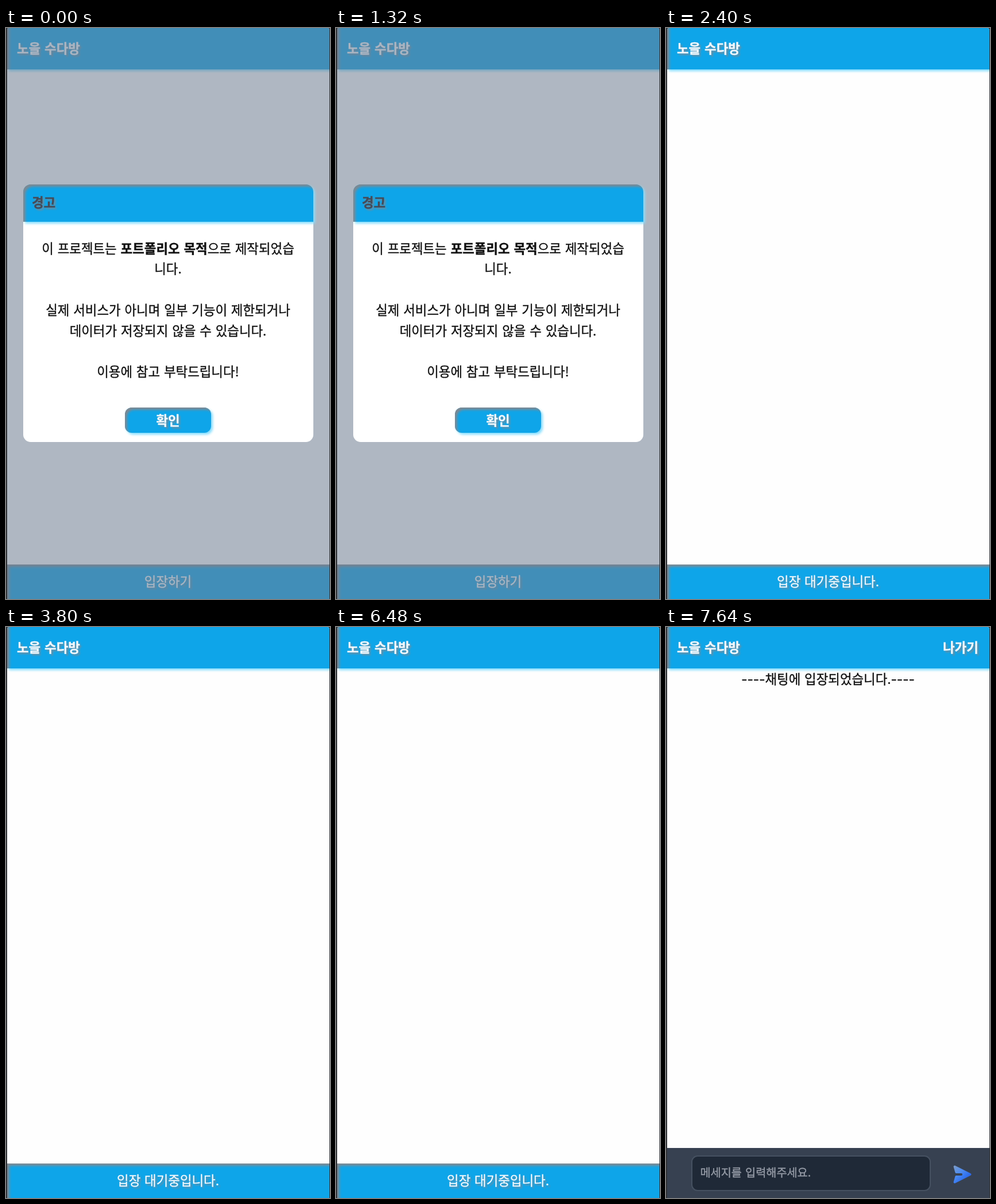
These frames come from a looping animation (564x993 px, 8 s). An HTML page:

```html
<!DOCTYPE html>
<html lang="ko">
<head>
<meta charset="utf-8">
<title>채팅 입장</title>
<style>
  html, body { margin: 0; width: 100%; height: 100%; overflow: hidden; background: #303236; }
  #stage {
    position: relative; width: 564px; height: 993px; overflow: hidden;
    font-family: "Noto Sans CJK KR", "Noto Sans KR", "Noto Sans CJK JP", sans-serif;
    word-spacing: .6px;
  }
  #stage div, #stage svg { position: absolute; box-sizing: border-box; }
  #page { left: 1.5px; top: 0; width: 561px; height: 993px; background: #fefefe; border-radius: 4px 4px 0 0; overflow: hidden; }
  .layer { left: 0; top: 0; width: 564px; height: 993px; }
  .blue {
    background: #0ea5e9;
    box-shadow: inset 4px 4px 4px #808890, 3px 3px 4px #84deff;
  }
  #head { left: 0; top: -10px; width: 570px; height: 82px; }
  #foot { left: 0; top: 933px; width: 570px; height: 70px; }
  #bar { left: 1.5px; top: 906px; width: 561px; height: 87px; background: #374151; }
  #field { left: 44px; top: 919px; width: 417px; height: 62px; background: #1f2937; border: 2px solid #465161; border-radius: 11px; }
  #dim { left: 1.5px; top: 0; width: 561px; height: 993px; background: #6e7c90; opacity: .54; }
  #box { left: 30px; top: 272px; width: 505px; height: 448px; background: #fff; border-radius: 13px; }
  #boxHead { left: 30px; top: 272px; width: 505px; height: 65px; border-radius: 13px 13px 0 0; }
  #ok { left: 207px; top: 660px; width: 150px; height: 44px; border-radius: 12px; }
  .t { white-space: pre; line-height: 36px; height: 36px; -webkit-text-stroke: .35px; }
  .mid { left: 0; width: 564px; text-align: center; }
  .lit { color: #f2f8fc; text-shadow: 3px 3px 3px #6f8c9e; }
  .dash { font-family: Inter, sans-serif; }
</style>
</head>
<body>
<div id="stage">
  <div id="page">
    <div id="head" class="blue"></div>
    <div id="foot" class="blue"></div>
  </div>
  <div id="labels" class="layer"></div>
  <div id="chat" class="layer">
    <div id="bar"></div>
    <div id="field"></div>
    <svg class="layer" viewBox="0 0 564 993">
      <defs>
        <linearGradient id="plane" x1="0" y1="1" x2="1" y2="0">
          <stop offset="0" stop-color="#7f9cc4"/>
          <stop offset=".35" stop-color="#4f8df0"/>
          <stop offset=".6" stop-color="#3576f0"/>
          <stop offset="1" stop-color="#1d4ed8"/>
        </linearGradient>
      </defs>
      <path transform="translate(516 952) rotate(90) scale(1.93) translate(-10 -10)" fill="url(#plane)"
        d="M10.9 2.55a1 1 0 0 0-1.8 0l-7 14a1 1 0 0 0 1.17 1.41l5-1.43A1 1 0 0 0 9 15.57V11a1 1 0 1 1 2 0v4.57a1 1 0 0 0 .73.96l5 1.43a1 1 0 0 0 1.17-1.41z"/>
    </svg>
  </div>
  <div id="modal" class="layer">
    <div id="dim"></div>
    <div id="box"></div>
    <div id="boxHead" class="blue"></div>
    <div id="ok" class="blue"></div>
  </div>
</div>
<script>
const LOOP = 8000, CLOSE = 1360, WAIT = 2400, ENTER = 6520;
const $ = id => document.getElementById(id);

// Adds one line of text by its baseline; without x it is centred.
function text(layer, html, y, { x, size = 22.4, weight = 400, color = '#111', cls = '' } = {}) {
  const el = document.createElement('div');
  el.className = 't ' + cls + (x === undefined ? ' mid' : '');
  el.innerHTML = html;
  if (x !== undefined) el.style.left = x + 'px';
  el.style.top = (y - 18 - 0.436 * size) + 'px';
  el.style.fontSize = size + 'px';
  el.style.fontWeight = weight;
  if (!cls) el.style.color = color;
  $(layer).append(el);
  return el;
}

text('labels', '노을 수다방', 43.5, { x: 19, weight: 700, cls: 'lit' });
const action = text('labels', '', 970.5, { cls: 'lit' });

const dash = '<span class="dash">----</span>';
text('chat', '나가기', 43.5, { x: 482, weight: 700, cls: 'lit' });
text('chat', dash + '채팅에 입장되었습니다.' + dash, 98.5);
text('chat', '메세지를 입력해주세요.', 957, { x: 59.5, size: 19.7, color: '#969ca7' });

const warn = text('modal', '경고', 312, { x: 45, weight: 700, color: '#454b58' });
warn.style.textShadow = '3px 3px 3px #6f8c9e';
[
  '이 프로젝트는 <b>포트폴리오 목적</b>으로 제작되었습',
  '니다.',
  '',
  '실제 서비스가 아니며 일부 기능이 제한되거나',
  '데이터가 저장되지 않을 수 있습니다.',
  '',
  '이용에 참고 부탁드립니다!'
].forEach((line, i) => line && text('modal', line, 391.5 + 35.75 * i));
text('modal', '확인', 690.5, { weight: 700, cls: 'lit' });

const show = (el, on) => { el.style.display = on ? 'block' : 'none'; };

function draw(t) {
  const inside = t >= ENTER;
  show($('modal'), t < CLOSE);
  show($('chat'), inside);
  show($('foot'), !inside);
  show(action, !inside);
  const label = t < WAIT ? '입장하기' : '입장 대기중입니다.';
  if (action.textContent !== label) action.textContent = label;
}

const start = performance.now();
function tick() {
  draw((performance.now() - start) % LOOP);
  requestAnimationFrame(tick);
}
tick();
</script>
</body>
</html>
```
